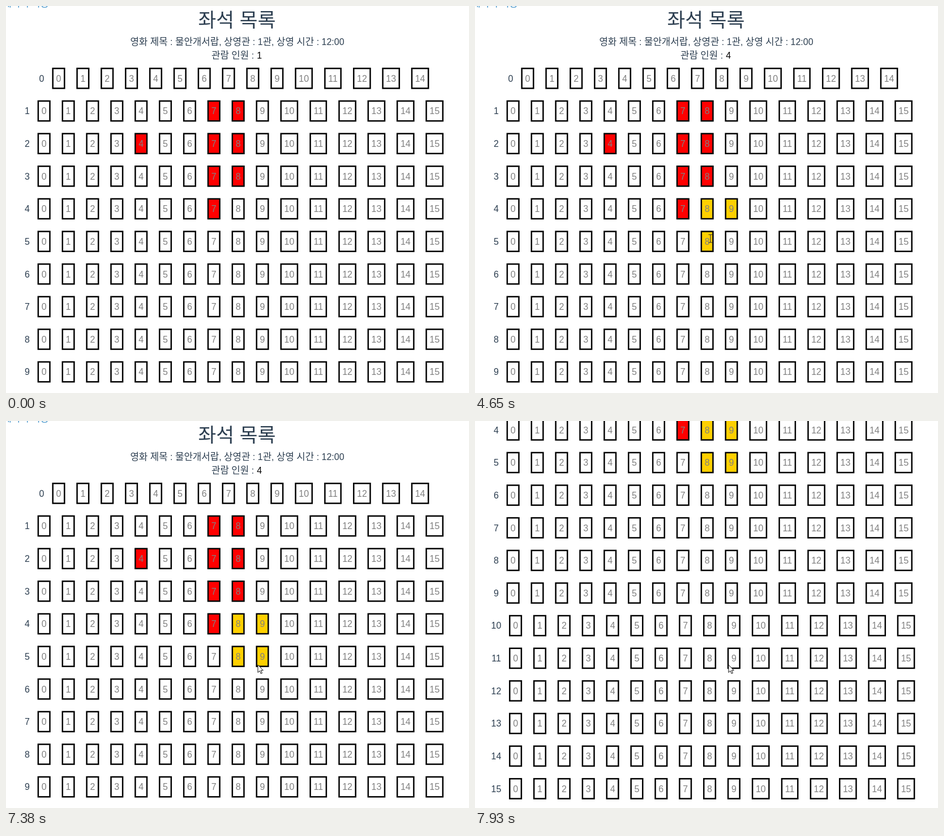
An HTML page for the animation above (8000 ms loop, 818x684 px).

```html
<!DOCTYPE html>
<html lang="ko">
<head>
<meta charset="utf-8">
<style>
html, body { margin: 0; width: 100%; height: 100%; overflow: hidden; background: #fff; }
svg { display: block; width: 100vw; height: 100vh; }
text { white-space: pre; }
#dialog { filter: drop-shadow(0 5px 9px rgba(0, 0, 0, .36)); }
</style>
</head>
<body>
<svg id="stage" viewBox="0 0 818 684"></svg>
<script>
const LOOP = 8000, TICK = 77.9;
const LATIN = '"Liberation Sans", Arial, sans-serif';
const HANGUL = '"Noto Sans CJK KR", "Noto Sans CJK", sans-serif';
const INK = '#2c3e50', RED = '#f00', YELLOW = '#ffd000';

const stage = document.getElementById('stage');

function add(parent, tag, attrs = {}, content) {
  const node = document.createElementNS('http://www.w3.org/2000/svg', tag);
  for (const [key, value] of Object.entries(attrs)) node.setAttribute(key, value);
  if (content !== undefined) node.textContent = content;
  parent.append(node);
  return node;
}

// Hangul and Latin runs get their own font and size.
function label(parent, content, x, y, { size = 16, ratio = 1.05, fill = INK, latin = LATIN, ...rest } = {}) {
  const node = add(parent, 'text', { x, y, fill, 'font-family': latin, 'font-size': size, ...rest });
  for (const run of content.split(/([가-힣]+)/).filter(Boolean)) {
    const korean = /[가-힣]/.test(run);
    add(node, 'tspan', korean ? { 'font-family': HANGUL, 'font-size': size * ratio } : {}, run);
  }
  return node;
}

const centered = { 'text-anchor': 'middle' };
const page = add(stage, 'g');

label(page, '영화 페이지 이동', 76, 1, { fill: '#3b8fc8', 'text-anchor': 'end' });
label(page, '좌석 목록', 408, 37, { size: 34.6, ratio: 1, latin: HANGUL, ...centered });
label(page, '영화 제목 : 물안개서랍, 상영관 : 1관, 상영 시간 : 12:00', 408.5, 69, centered);
label(page, '관람 인원 : ', 363, 92.5);
const count = label(page, '1', 443.2, 92.5, { fill: '#000' });
const ring = add(page, 'rect', { x: 443.5, y: 75.5, width: 9.2, height: 23, rx: 2.5, fill: 'none', stroke: '#000', 'stroke-width': 1.8 });

// Seats
const rowY = row => 127.9 + row * 57.64;
const seatX = i => i < 10 ? i * 42.87 : 433.2 + (i - 10) * 51.35;
const rowX = row => row === 0 ? 93 : row < 10 ? 67.2 : 71.6;
const seats = {};
for (let row = 0; row <= 16; row++) {
  const y = rowY(row);
  label(page, String(row), row ? 37.5 : 63, y + 5.8, centered);
  for (let i = 0; i < (row ? 16 : 15); i++) {
    const x = rowX(row) + seatX(i);
    const width = i < 10 ? 20.6 : i === 11 ? 28.3 : 29.2;
    seats[row + '-' + i] = add(page, 'rect', {
      x: x - width / 2, y: y - 17.6, width, height: 35.2, fill: '#fff', stroke: '#000', 'stroke-width': 2.5
    });
    label(page, String(i), x, y + 5.8, { fill: '#808080', ...centered });
  }
}
for (const id of ['1-7', '1-8', '2-4', '2-7', '2-8', '3-7', '3-8', '4-7']) seats[id].setAttribute('fill', RED);

// Drop-down list
const popup = add(stage, 'g');
add(popup, 'rect', { x: 443.5, y: 99.5, width: 17, height: 162, fill: '#fff', stroke: '#767676' });
const options = Array.from({ length: 8 }, (_, i) => {
  const back = add(popup, 'rect', { x: 444, y: 100 + i * 20, width: 16, height: 20 });
  const digit = label(popup, String(i + 1), 447.2, 115.5 + i * 20);
  return { back, digit };
});

// Alert
const dialog = add(stage, 'g', { id: 'dialog' });
add(dialog, 'rect', { x: 413, y: -60, width: 450, height: 161, rx: 4, fill: '#fff' });
label(dialog, 'localhost:8081의 메시지', 428, 7, {
  size: 13.4, ratio: 1.15, fill: '#1b1b1b', latin: '"Open Sans", sans-serif', 'font-weight': 600
});
label(dialog, '관람 인원 초과', 428, 35.5, { size: 13.6, ratio: 1, fill: '#1b1b1b', latin: HANGUL });
add(dialog, 'rect', { x: 773, y: 54, width: 80, height: 32, rx: 2, fill: '#0078d7' });
label(dialog, '확인', 792.5, 74.5, { size: 13.6, ratio: 1, fill: '#fff' });

// Pointer
const pointer = add(stage, 'g');
const arrow = add(pointer, 'path', {
  d: 'M0 0V13.5L3.2 10.6 5.3 15.5 7.5 14.6 5.4 9.8H9.4Z', fill: '#fff', stroke: '#111', 'stroke-width': 1
});
const beam = add(pointer, 'path', {
  d: 'M-3.5-7H-1L0-6 1-7H3.5M0-6V6M-3.5 7H-1L0 6 1 7H3.5', fill: 'none', stroke: '#333', 'stroke-width': 1.1
});

// time, x, y, text cursor
const path = [
  [370, 747, 632], [600, 640, 400], [850, 500, 160], [1000, 436, 82], [1150, 447, 86],
  [1300, 447, 87], [1600, 450, 146], [1770, 450, 152], [1930, 451, 161], [2160, 449, 159],
  [2230, 451, 158], [2390, 451, 158], [2785, 427, 336], [3080, 414, 354, 1], [3160, 424, 357],
  [3420, 459, 362], [3570, 459, 362], [3800, 460, 320], [4200, 460, 320], [4480, 416, 411, 1],
  [4670, 416, 411], [4880, 450, 414, 1], [4960, 454, 415], [5270, 514, 412], [5410, 506, 413],
  [5580, 504, 413], [5730, 508, 408], [6140, 794, 110], [6400, 804, 56], [6530, 800, 64],
  [6600, 800, 66], [6760, 770, 110], [7200, 448, 425], [7380, 445, 431], [7610, 444, 430], [7930, 448, 431]
];
const scrolls = [[0, 0], [7530, 12], [7610, 95], [7700, 150], [7770, 215], [7850, 290], [7930, 342.6]];
const picks = [['4-8', 3080], ['4-9', 3570], ['5-8', 4640], ['5-9', 4960]];

const show = (node, on) => node.setAttribute('visibility', on ? 'visible' : 'hidden');
const lastBefore = (table, t) => table.filter(step => step[0] <= t).pop();

function pointerAt(time) {
  const t = 370 + Math.floor((time - 350) / TICK) * TICK;
  const from = lastBefore(path, t) || path[0];
  const to = path[path.indexOf(from) + 1] || from;
  const k = to === from ? 0 : Math.max(0, (t - from[0]) / (to[0] - from[0]));
  return { x: from[1] + (to[1] - from[1]) * k, y: from[2] + (to[2] - from[2]) * k, text: !!from[3] };
}

function draw(t) {
  const p = pointerAt(t);
  show(pointer, t >= 370);
  pointer.setAttribute('transform', `translate(${p.x} ${p.y})`);
  arrow.style.display = p.text ? 'none' : '';
  beam.style.display = p.text ? '' : 'none';

  page.setAttribute('transform', `translate(0 ${-lastBefore(scrolls, t)[1]})`);
  count.firstChild.textContent = t < 2390 ? '1' : '4';
  show(ring, t >= 1300 && t < 3080);
  for (const [id, time] of picks) seats[id].setAttribute('fill', t >= time ? YELLOW : '#fff');

  show(popup, t >= 1300 && t < 2390);
  const hover = Math.max(0, Math.floor((p.y - 100) / 20));
  options.forEach(({ back, digit }, i) => {
    back.setAttribute('fill', i === hover ? '#1967d2' : '#fff');
    digit.setAttribute('fill', i === hover ? '#fff' : '#000');
  });
  show(dialog, t >= 5490 && t < 6600);
}

function frame(now) {
  draw(now % LOOP);
  requestAnimationFrame(frame);
}
draw(0);
requestAnimationFrame(frame);
</script>
</body>
</html>
```
